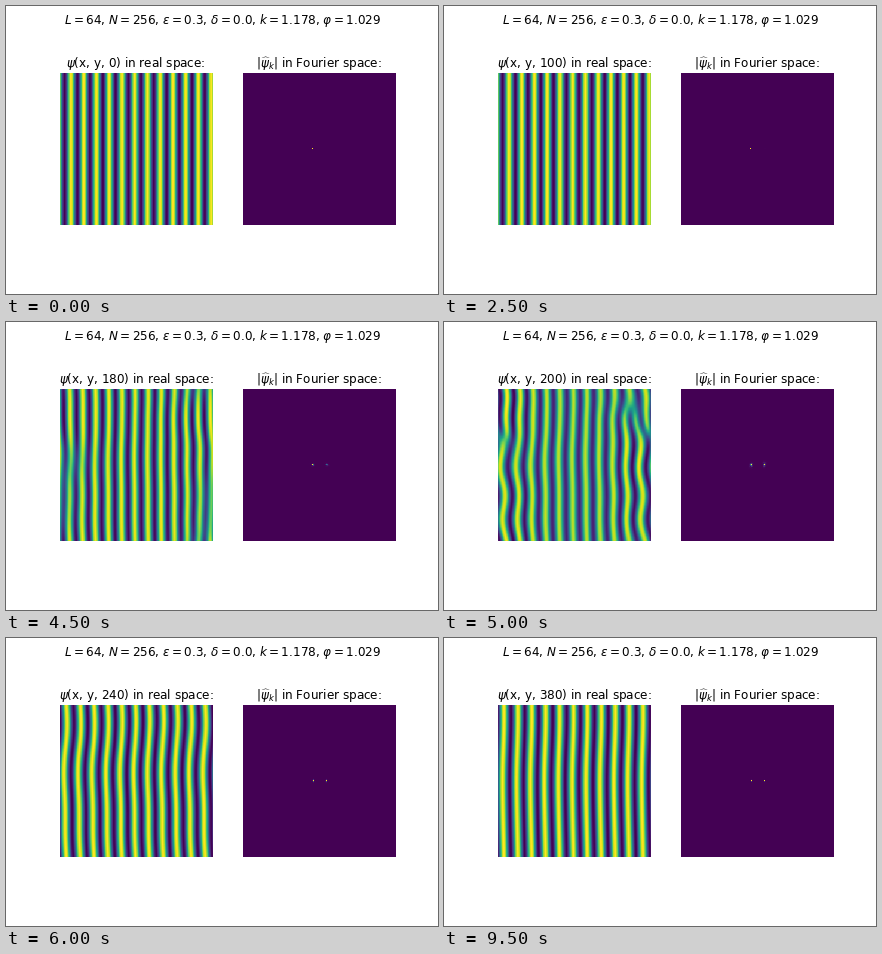
A matplotlib script for the animation above (10000 ms loop, 432 px wide and 288 px high).

```python
import numpy as np
import matplotlib.pyplot as plt
from matplotlib.animation import FuncAnimation

plt.rcParams.update({
    "font.family": "DejaVu Sans",
    "font.size": 10,
    "mathtext.fontset": "dejavusans",
    "figure.subplot.bottom": 0.125,
    "figure.subplot.top": 0.88,
})

L, N = 64, 256
PHI = 1.029
FRAMES, INTERVAL, TIME_STEP = 20, 500, 20
STRIPE_PX = 152.2 / 11  # width of one relaxed stripe on screen

X, Y = np.meshgrid(2 * np.pi * np.arange(N) / N, np.arange(N) / N)
EDGE = np.cos(X / 2) ** 4


def wave(harmonic, peak):
    return np.cos(2 * np.pi * harmonic * (Y - peak))


def slip_fraction(t):
    """Share of the 11-stripe mode; the slip comes last near the upper quarter."""
    t_slip = 186 + 20 * np.exp(3 * (wave(1, 0.22) - 1))
    return 1 / (1 + np.exp(-0.05 * (t - t_slip)))


def bend_phase(t):
    """Bending of the relaxed stripes, straightening out by diffusion."""
    age = max(t - 240, 0)
    shift = (0.3 + 1.1 * wave(1, 0.05) * np.exp(-0.0032 * age)
             + 0.55 * wave(2, 0.15) * np.exp(-0.0128 * age))
    return -2 * np.pi * shift / STRIPE_PX


def real_field(t):
    if t == 0:
        return np.cos(12 * X + PHI)
    b = slip_fraction(t)
    envelope = (1 - b) - b * np.exp(1j * (bend_phase(t) - X))
    size = np.abs(envelope)
    pulse = np.exp(-((t - 200) / 17) ** 2)
    amplitude = size / np.hypot(size, 0.25) * (1 + 0.35 * EDGE * pulse)
    wiggle = 0.6 * pulse * EDGE * wave(3, 0.2)
    return amplitude * np.cos(12 * X + PHI + np.angle(envelope) + wiggle)


def spectrum(field):
    return np.abs(np.fft.fftshift(np.fft.fft2(field)))


def panel(ax, data, title):
    ax.axis("off")
    image = ax.imshow(data, cmap="viridis", interpolation="nearest")
    return image, ax.set_title(title, fontsize=12, y=1.0)


def real_title(t):
    return rf"$\psi$(x, y, {t}) in real space:"


fig, (ax_real, ax_fourier) = plt.subplots(1, 2, figsize=(6, 4), dpi=72)
fig.suptitle(
    r"$L=64$, $N=256$, $\varepsilon=0.3$, $\delta=0.0$, $k=1.178$, $\varphi=1.029$",
    fontsize=12,
)
start = real_field(0)
real_image, title = panel(ax_real, start, real_title(0))
fourier_image, _ = panel(ax_fourier, spectrum(start),
                         r"$|\widehat{\psi}_k|$ in Fourier space:")


def update(frame):
    t = frame * TIME_STEP
    field = real_field(t)
    for image, data in ((real_image, field), (fourier_image, spectrum(field))):
        image.set_data(data)
        image.set_clim(data.min(), data.max())
    title.set_text(real_title(t))
    return real_image, fourier_image, title


animation = FuncAnimation(fig, update, frames=FRAMES, interval=INTERVAL,
                          repeat=True, repeat_delay=0, blit=False)
plt.show()
```
